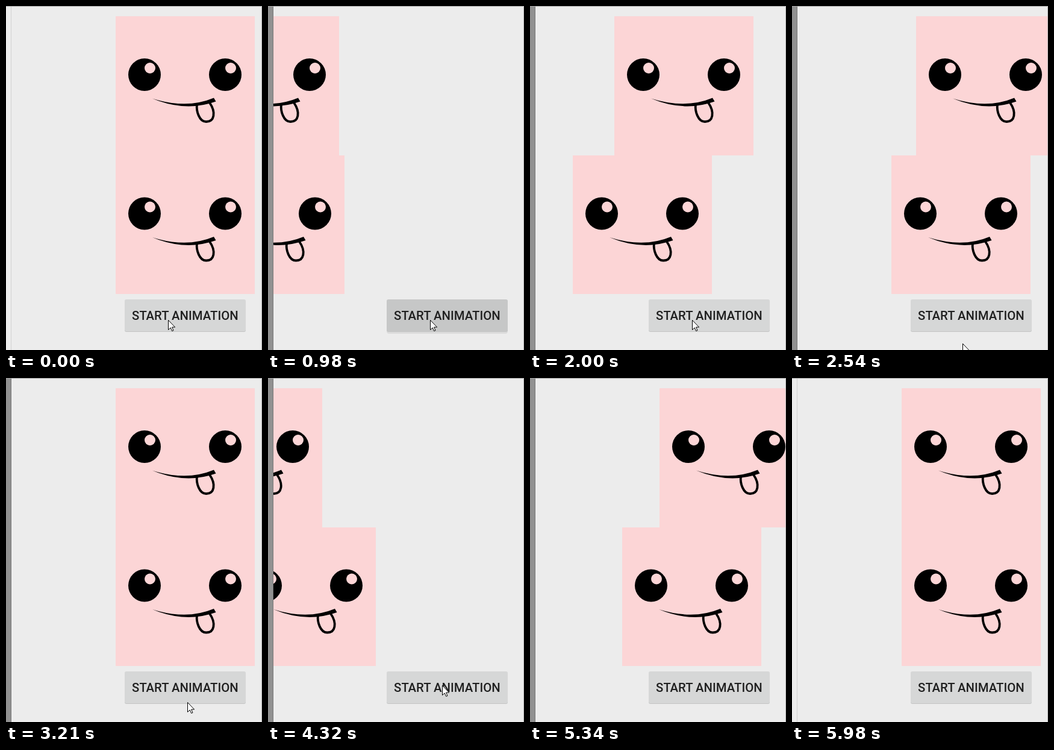
An HTML page for the animation above (6080 ms loop, 425 by 571 pixels).

```html
<!DOCTYPE html>
<html lang="en">
<head>
<meta charset="utf-8">
<title>Sliding faces</title>
<style>
  html, body { margin: 0; width: 100%; height: 100%; overflow: hidden; background: #ececec; }
  svg { display: block; width: 425px; height: 571px; }
  text { font: 500 20.34px Roboto, sans-serif; fill: #202020; text-anchor: middle; }
</style>
</head>
<body>
<svg viewBox="0 0 425 571">
  <defs>
    <clipPath id="screen"><rect x="9" y="1" width="415" height="570"/></clipPath>
    <g id="face">
      <rect width="231" height="230.5" fill="#fcd5d6" shape-rendering="crispEdges"/>
      <g id="eye">
        <circle cx="48" cy="97" r="27"/>
        <circle cx="57" cy="86" r="9" fill="#fcd5d6"/>
      </g>
      <use href="#eye" x="134"/>
      <path d="M61 136.5Q118 154.5 163 135.5L166.5 141.5Q116 159.5 61 136.5Z"/>
      <path d="M135 146.5C133.5 157.5 139 175 150 175C164 175.5 167 159.5 156 143.5" fill="none" stroke="#000" stroke-width="3.8"/>
    </g>
  </defs>
  <rect width="425" height="571" fill="#ececec"/>
  <g clip-path="url(#screen)">
    <use id="top" href="#face"/>
    <use id="low" href="#face"/>
  </g>
  <rect id="lift" x="197" y="490" width="201" height="54" rx="4"/>
  <rect x="197" y="488" width="201" height="53" rx="3" fill="#c4c5c5"/>
  <rect id="button" x="197" y="487" width="201" height="53" rx="3"/>
  <text x="297.4" y="521">START ANIMATION</text>
  <rect id="bar" y="1" width="8" height="570"/>
  <rect id="edge" x="8" y="1" width="1" height="570"/>
  <rect width="425" height="1" fill="#a0a0a0"/>
  <rect x="424" width="1" height="571" fill="#b4b4b4"/>
  <path id="cursor" d="M.5.5V16.5L4.2 13L6.7 18.5L9 17.5L6.6 12.1H11.6Z" fill="#fff" stroke="#000"/>
</svg>
<script>
const LOOP = 6080, SPAN = 2000, FROM = -107, TO = 182;
const FOCUS = 560, BLUR = 5980, SECOND = 3210;
const $ = id => document.getElementById(id);
const clamp = v => Math.max(0, Math.min(1, v));

// Each click presses the button, then slides the faces in.
const clicks = [{ press: 560, show: 980, start: 850 }, { press: 3570, show: 3840, start: 3748 }];

// Cursor way points: time, x, y.
const path = [[2300, 269, 521], [2660, 290, 580], [3180, 312, 580], [3210, 301, 538],
  [3450, 289, 510], [4840, 289, 510], [5220, 430, 530]];

// The screen refreshes at a steady rate, rounded down to 30 ms units.
function snap(time) {
  const [from, step] = time < SECOND ? [980, 130] : [SECOND, 126];
  const next = 30 * (Math.floor((time - from) / 30) + 1);
  const count = Math.ceil(next / step) - 1;
  return from + 30 * Math.floor(count * step / 30);
}

const smooth = p => (1 - Math.cos(Math.PI * p)) / 2;

// Pulls back, then overshoots.
function swing(p) {
  const u = p < .5 ? 2 * p : 2 * p - 2;
  return p < .5 ? u * u * (4 * u - 3) / 2 : u * u * (4 * u + 3) / 2 + 1;
}

function along(t) {
  const i = path.findIndex(k => k[0] > t);
  if (i < 1) return path.at(i).slice(1);
  const [t0, x0, y0] = path[i - 1], [t1, x1, y1] = path[i];
  const f = (t - t0) / (t1 - t0);
  return [x0 + (x1 - x0) * f, y0 + (y1 - y0) * f];
}

function move(id, x, y) {
  $(id).setAttribute("transform", `translate(${Math.round(x)} ${y})`);
}

function draw(now) {
  const time = now % LOOP;
  const t = snap(time);

  const run = clicks.findLast(c => t >= c.show);
  const p = run ? clamp((t - run.start) / SPAN) : 1;
  const x = amount => FROM + (TO - FROM) * amount;
  move("top", x(swing(p)), 17);
  move("low", x(smooth(p)), 247.5);

  const click = clicks.findLast(c => t >= c.press);
  const age = click ? t - click.press : SPAN;
  const press = clamp(Math.min(age / 240 + .5, (660 - age) / 240));
  const g = Math.round(214 - 16 * press);
  $("button").setAttribute("fill", `rgb(${g},${g + 1},${g + 1})`);
  $("lift").setAttribute("opacity", age > 250 ? .07 * press : 0);

  const active = time >= FOCUS && time < BLUR;
  $("bar").setAttribute("fill", active ? "#919191" : "#ececec");
  $("edge").setAttribute("fill", active ? "#777" : "#d2d2d2");

  const [cx, cy] = along(t);
  move("cursor", cx, Math.round(cy));
}

let begin;
function loop(now) {
  begin ??= now;
  draw(now - begin);
  requestAnimationFrame(loop);
}
draw(0);
requestAnimationFrame(loop);
</script>
</body>
</html>
```
